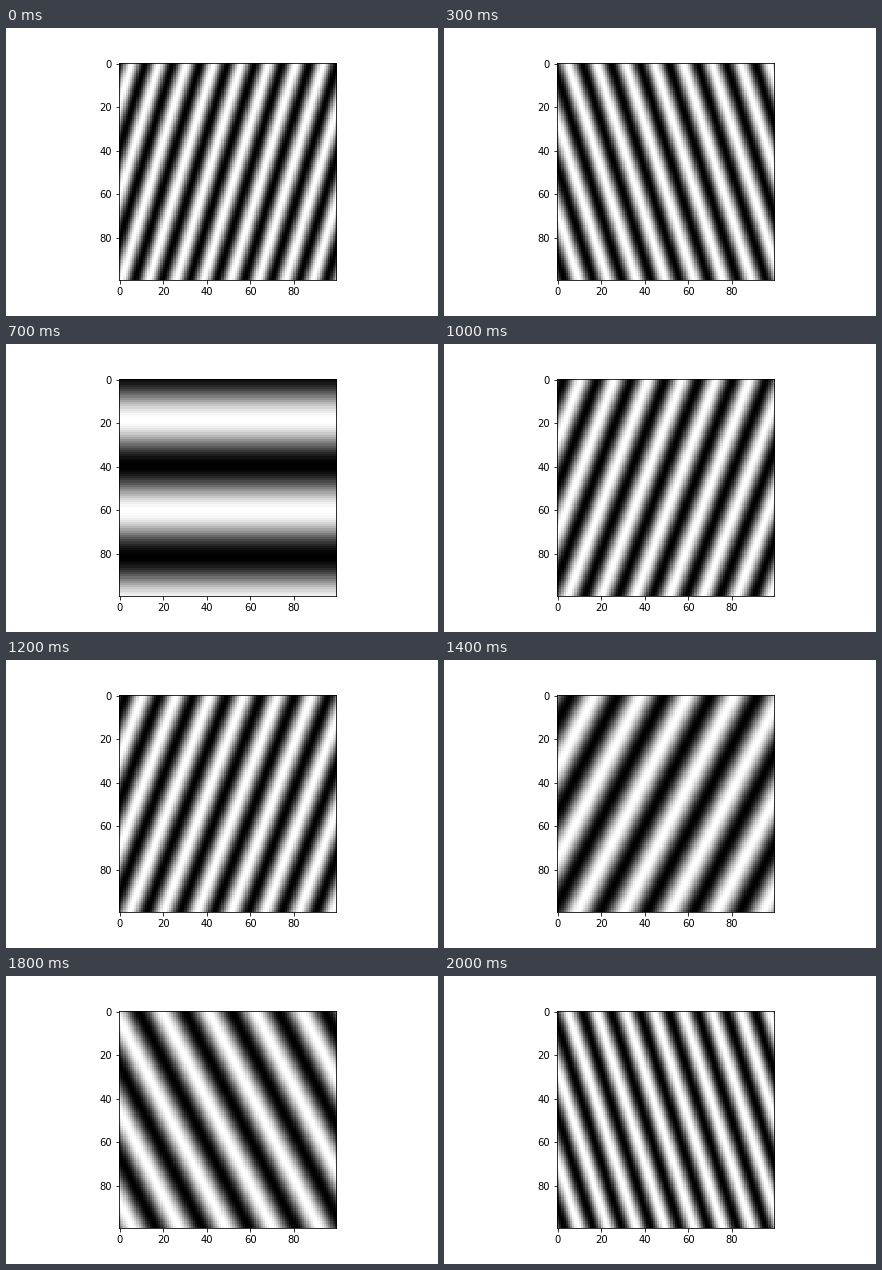
Write a matplotlib script that moves like this. It is 432 by 288 pixels and loops after 2.1 s.

```python
import matplotlib.pyplot as plt
import numpy as np
from matplotlib.animation import FuncAnimation

STEPS = 20
# Wave steps play in alphabetical order: 0, 1, 10, 11, ..., 19, 2, 20, 3, ...
ORDER = sorted(range(STEPS + 1), key=str)

axis = np.arange(-5, 5, 0.1)
X, Y = np.meshgrid(axis, axis)


def wave(step):
    kx = 5 * np.cos(2 * np.pi * step / STEPS)
    return np.sin(kx * X + 1.5 * Y)


fig, ax = plt.subplots(figsize=(6, 4), dpi=72, facecolor="white")
fig.subplots_adjust(left=0.125, right=0.9, bottom=0.125, top=0.88)
image = ax.imshow(wave(ORDER[0]), cmap="gray", interpolation="nearest")


def update(i):
    image.set_data(wave(ORDER[i]))
    image.autoscale()
    return [image]


anim = FuncAnimation(fig, update, frames=len(ORDER), interval=100,
                     repeat=True, repeat_delay=0, blit=False)
plt.show()
```
